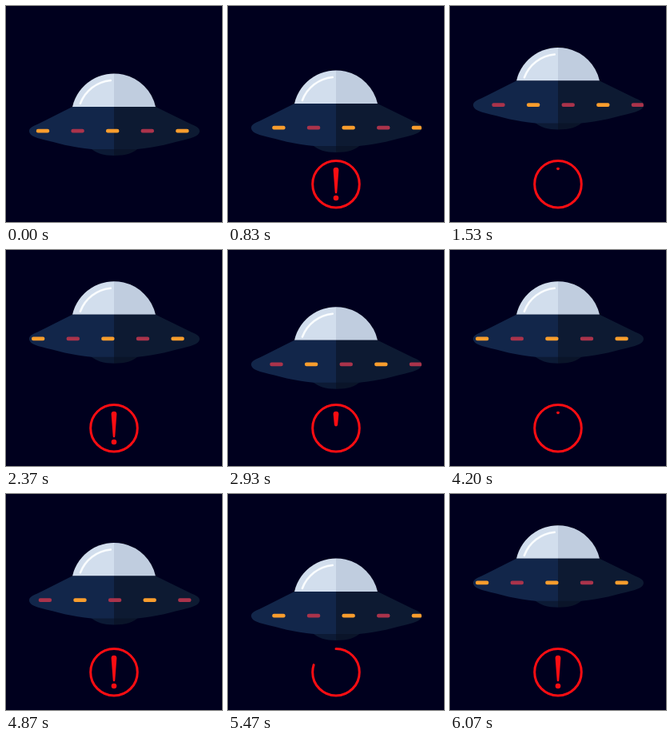
An HTML page with a canvas that plays this animation: 270 by 270 pixels, repeating every 6110 ms.

```html
<!DOCTYPE html>
<html lang="en">
<head>
<meta charset="utf-8">
<title>Saucer alert</title>
<style>
html, body { margin: 0; width: 100%; height: 100%; overflow: hidden; background: #00001e; }
canvas { display: block; width: 100vmin; height: 100vmin; }
</style>
</head>
<body>
<canvas id="stage"></canvas>
<script>
const SIZE = 270, LOOP = 6110, MID = 135;
const BOB = 30;          // steps in one hover and light cycle
const RISE = 14;         // steps spent going up
const LOW = 126, HIGH = 79;
const SIGN = 40;         // ticks in one warning cycle
const GAP = 43.6;        // distance between lights

const canvas = document.getElementById('stage');
const ctx = canvas.getContext('2d');
const scale = Math.max(1, window.devicePixelRatio || 1);
canvas.width = canvas.height = SIZE * scale;

const clamp = v => Math.min(1, Math.max(0, v));
const sineEase = u => (1 - Math.cos(Math.PI * u)) / 2;

function fillHalves(path, left, right) {
  ctx.save();
  ctx.clip(path);
  ctx.fillStyle = left;
  ctx.fillRect(0, -80, MID, 180);
  ctx.fillStyle = right;
  ctx.fillRect(MID, -80, MID, 180);
  ctx.restore();
}

// Shapes are placed relative to the dome's base line at y = 0.
const dome = new Path2D();
const tilt = Math.asin(11.8 / 53.3);
dome.arc(MID, 11.8, 53.3, Math.PI + tilt, -tilt);
dome.closePath();

const hull = new Path2D(
  'M83 0H187C202 7 217 15 232 22C239 25 242 27 242 30.5' +
  'C242 35 236 38 228 40C208 45 188 51 164 53H107' +
  'C83 51 63 45 43 40C35 38 29 35 29 30.5C29 27 32 25 39 22C54 15 68 7 83 0Z');

const belly = new Path2D('M105 51H166C160 58 149 61 135.500 61S112 58 105 51Z');

function drawLights(step) {
  const shift = step * GAP * 4 / BOB;
  ctx.save();
  ctx.clip(hull);
  for (let i = 0; i < 10; i++) {
    const x = 46 + i * GAP - shift;
    ctx.fillStyle = i % 2 ? '#aa334b' : '#f99d2d';
    ctx.beginPath();
    ctx.roundRect(x - 8.2, 27.700, 16.4, 4.8, 2.2);
    ctx.fill();
  }
  ctx.restore();
}

function drawSaucer(step) {
  const u = step < RISE ? 1 - step / RISE : (step - RISE) / (BOB - RISE);
  ctx.save();
  ctx.translate(0, HIGH + (LOW - HIGH) * sineEase(u));
  fillHalves(belly, '#0c1a35', '#0a1429');
  fillHalves(dome, '#d2deed', '#c0cddf');
  ctx.strokeStyle = '#fafdff';
  ctx.lineWidth = 2.6;
  ctx.lineCap = 'round';
  ctx.beginPath();
  ctx.arc(MID, 11.8, 45, Math.PI * 1.115, Math.PI * 1.47);
  ctx.stroke();
  fillHalves(hull, '#12264a', '#0d1a32');
  drawLights(step);
  ctx.restore();
}

function drawSign(tick) {
  const ring = clamp(tick / 5);
  const bar = clamp((tick - 5) / 5);
  const dot = clamp((tick - 9) / 3);
  ctx.strokeStyle = ctx.fillStyle = '#fc0d12';
  if (ring > 0) {
    ctx.lineWidth = 3;
    ctx.lineCap = 'round';
    ctx.beginPath();
    ctx.arc(MID, 222.7, 29.3, -Math.PI / 2, Math.PI * (2 * ring - 0.5));
    ctx.stroke();
  }
  if (bar > 0) {
    // Tapered stroke that grows downwards from a small round tip.
    const grow = clamp((tick - 5) / 3);
    const top = 1.6 + 1.8 * grow;
    const tip = top - 2.1 * bar;
    const end = 203.5 + 29.5 * sineEase(clamp((tick - 6) / 4));
    ctx.beginPath();
    ctx.arc(MID, 201.700 + top, top, Math.PI, 0);
    ctx.lineTo(MID + tip, end);
    ctx.arc(MID, end, tip, 0, Math.PI);
    ctx.closePath();
    ctx.fill();
  }
  if (dot > 0) {
    ctx.beginPath();
    ctx.arc(MID, 240, 3.3 * dot, 0, Math.PI * 2);
    ctx.fill();
  }
}

function draw(time) {
  const tick = Math.min(182, Math.floor((time % LOOP + 5) * 0.03));
  ctx.setTransform(scale, 0, 0, scale, 0, 0);
  ctx.fillStyle = '#00001e';
  ctx.fillRect(0, 0, SIZE, SIZE);
  drawSaucer(Math.round(tick * 14 / 13) % BOB);
  drawSign(tick % SIGN);
}

const start = performance.now();
function frame() {
  draw(performance.now() - start);
  requestAnimationFrame(frame);
}
frame();
</script>
</body>
</html>
```
